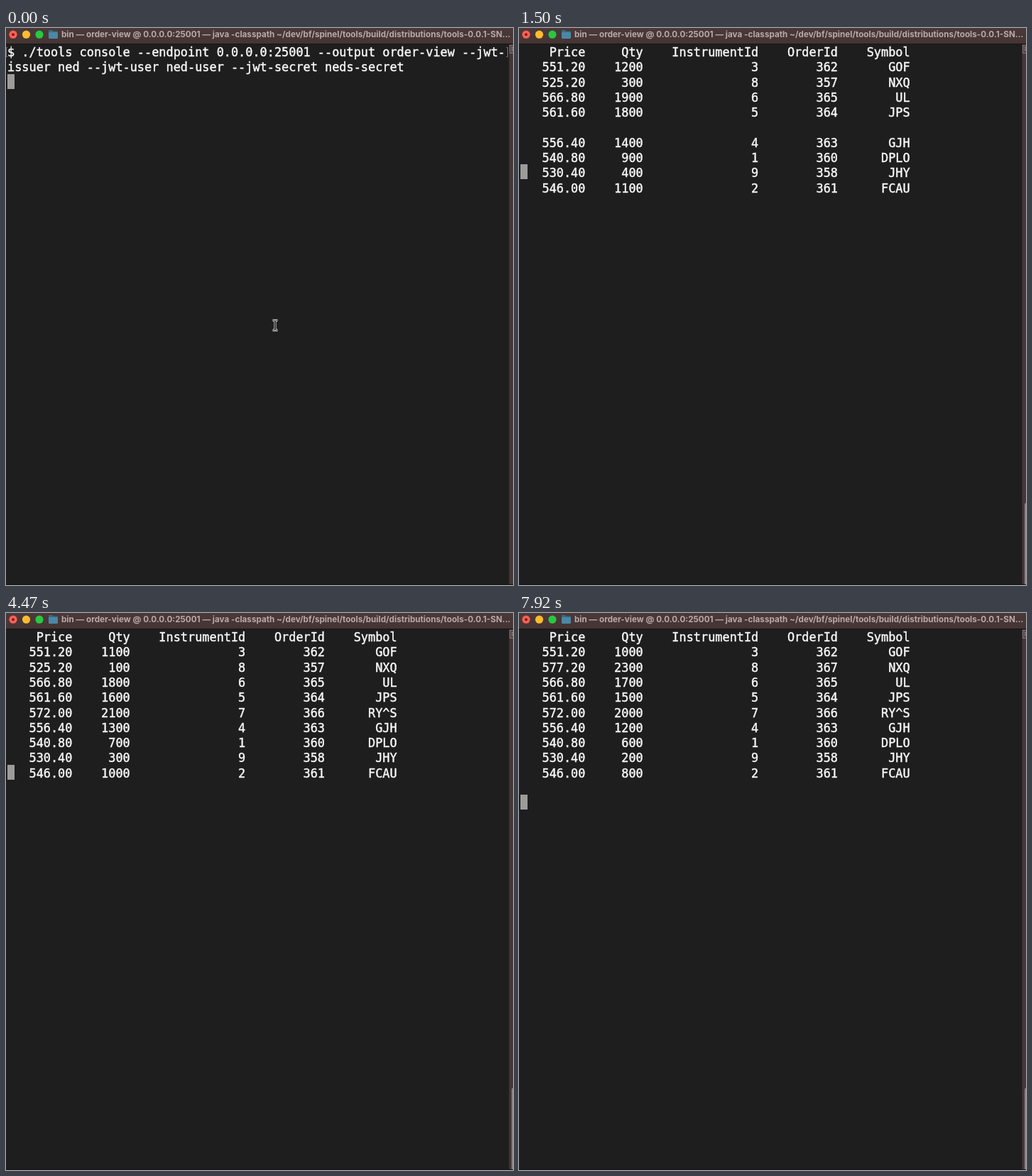
These frames come from a looping animation (714 px wide and 785 px high, 8000 ms). An HTML page:

```html
<!DOCTYPE html>
<html lang="en">
<head>
<meta charset="utf-8">
<title>Order view console</title>
<style>
  html, body { margin: 0; width: 100%; height: 100%; overflow: hidden; background: #1e1e1e; }
  svg { display: block; }
  .title { font: 700 11.7px Inter, "Open Sans", sans-serif; fill: #b9a9a9; }
  .term text {
    font: 400 16.89px "DejaVu Sans Mono", "Noto Sans Mono", monospace;
    fill: #f7f7f7; stroke: #f7f7f7; stroke-width: .45px;
    white-space: pre; font-variant-ligatures: none;
  }
</style>
</head>
<body>
<svg width="714" height="785" viewBox="0 0 714 785">
  <defs>
    <linearGradient id="bar" x2="0" y2="1">
      <stop offset="0" stop-color="#4b3939"/>
      <stop offset="1" stop-color="#453434"/>
    </linearGradient>
    <path id="beam" d="M375.5 412h1.5q2 0 2 2v10q0 2-2 2h-1.500M382.500 412h-1.500q-2 0-2 2v10q0 2 2 2h1.500"/>
  </defs>
  <rect width="714" height="785" fill="#1e1e1e"/>

  <rect width="714" height="22" fill="url(#bar)"/>
  <rect y="22" width="714" height="1" fill="#171313"/>
  <circle cx="10" cy="9.2" r="5.6" fill="#ff5f57"/>
  <circle cx="10" cy="9.2" r="1.9" fill="#7d1510"/>
  <circle cx="28.5" cy="9.2" r="5.6" fill="#febc2e"/>
  <circle cx="47" cy="9.2" r="5.6" fill="#28c840"/>
  <path d="M60 4q0-1 1-1h4l1.5 1.5H72q1 0 1 1V14H60z" fill="#356d88"/>
  <rect x="60" y="6" width="13" height="9" rx="1.2" fill="#4a88a6"/>
  <text class="title" x="78" y="13.2">bin — order-view @ 0.0.0.0:25001 — java -classpath ~/dev/bf/spinel/tools/build/distributions/tools-0.0.1-SN...</text>

  <rect x="708" y="23" width="6" height="762" fill="#453737"/>
  <rect x="708" y="23" width="1" height="762" fill="#332929"/>
  <rect x="709.5" y="24.5" width="8" height="11" fill="#574949" stroke="#807373"/>
  <path d="M712 28h3M712 31h3" stroke="#b0a5a5"/>
  <rect id="thumb" x="712" width="8" height="130" rx="3" fill="#8b8080"/>

  <g id="marks" fill="none" stroke="#777">
    <path d="M2 27.5H.5V40.5H2M704.5 27.5H706.5V40.5H704.5"/>
  </g>
  <rect id="cursor" x="2" width="10" height="21" fill="#9d9c9b"/>
  <g id="term" class="term"></g>

  <g id="pointer" fill="none">
    <use href="#beam" stroke="#eee" stroke-width="3"/>
    <use href="#beam" stroke="#111" stroke-width="1"/>
  </g>
  <rect y="784" width="714" height="1" fill="#111"/>
</svg>
<script>
const LOOP = 8000, PITCH = 21.3, TABLE_AT = 1050, SCREEN_ROWS = 10;
const $ = id => document.getElementById(id);

const COMMAND = [
  '$ ./tools console --endpoint 0.0.0.0:25001 --output order-view --jwt-',
  'issuer ned --jwt-user ned-user --jwt-secret neds-secret'
];
const HEADER = ['Price', 'Qty', 'InstrumentId', 'OrderId', 'Symbol'];
const EMPTY_WIDTHS = [8, 7, 16, 11, 10];
const WIDTHS = [9, 8, 16, 11, 10];

// quantity, instrument, order, symbol
const ORDERS = [
  [1200, 3, 362, 'GOF'], [300, 8, 357, 'NXQ'], [2000, 6, 365, 'UL'],
  [1800, 5, 364, 'JPS'], [100, 7, 356, 'RY^S'], [1500, 4, 363, 'GJH'],
  [900, 1, 360, 'DPLO'], [400, 9, 358, 'JHY'], [1100, 2, 361, 'FCAU']
];
// time, table row traded
const TRADES = [
  [1200, 3], [1350, 5], [1500, 6], [1800, 5], [1940, 2], [2240, 4], [2540, 7],
  [2990, 9], [3140, 1], [3290, 8], [3590, 3], [3880, 5], [4030, 6], [4180, 2],
  [4320, 4], [4470, 7], [5220, 9], [5370, 1], [5670, 8], [5970, 3], [6120, 5],
  [6270, 6], [6420, 2], [6720, 2], [7170, 4], [7470, 7], [7920, 9]
];

const layout = (cells, widths) => cells.map((c, i) => String(c).padStart(widths[i])).join('');

function orderLine([qty, instrument, order, symbol]) {
  if (!qty) return '';
  const price = (520 + 5.2 * (order - 356)).toFixed(2);
  return layout([price, qty, instrument, order, symbol], WIDTHS);
}

// A filled order leaves its row blank until the next order takes it.
function tableAt(t) {
  const rows = ORDERS.map(r => [...r]);
  let nextOrder = 366, cursor = 10;
  for (const [at, n] of TRADES) {
    if (at > t) break;
    const row = rows[n - 1];
    if (row[0]) row[0] -= 100;
    else {
      row[2] = nextOrder++;
      row[0] = 2200 + 100 * (row[2] - 366);
    }
    cursor = n + 2;
  }
  return { lines: [layout(HEADER, WIDTHS), ...rows.map(orderLine)], cursor };
}

function screenAt(t) {
  if (t < 150) return { lines: COMMAND, cursor: 2 };
  if (t < TABLE_AT) return { lines: [layout(HEADER, EMPTY_WIDTHS)], cursor: 1 };
  return tableAt(t);
}

const texts = Array.from({ length: SCREEN_ROWS }, (_, i) => {
  const el = document.createElementNS('http://www.w3.org/2000/svg', 'text');
  el.setAttribute('x', 2);
  el.setAttribute('y', (40 + i * PITCH).toFixed(1));
  $('term').append(el);
  return el;
});

const show = (id, on) => $(id).setAttribute('visibility', on ? 'visible' : 'hidden');

function draw(t) {
  const { lines, cursor } = screenAt(t);
  texts.forEach((el, i) => {
    const line = lines[i] || '';
    if (el.textContent !== line) el.textContent = line;
  });
  $('cursor').setAttribute('y', Math.round(21.9 + cursor * PITCH));
  $('thumb').setAttribute('y', t < TABLE_AT ? 670 : 669);
  show('thumb', t >= 150);
  show('marks', t < 150);
  show('pointer', t < 300);
}

const start = performance.now();
function tick() {
  draw((performance.now() - start) % LOOP);
  requestAnimationFrame(tick);
}
tick();
</script>
</body>
</html>
```
